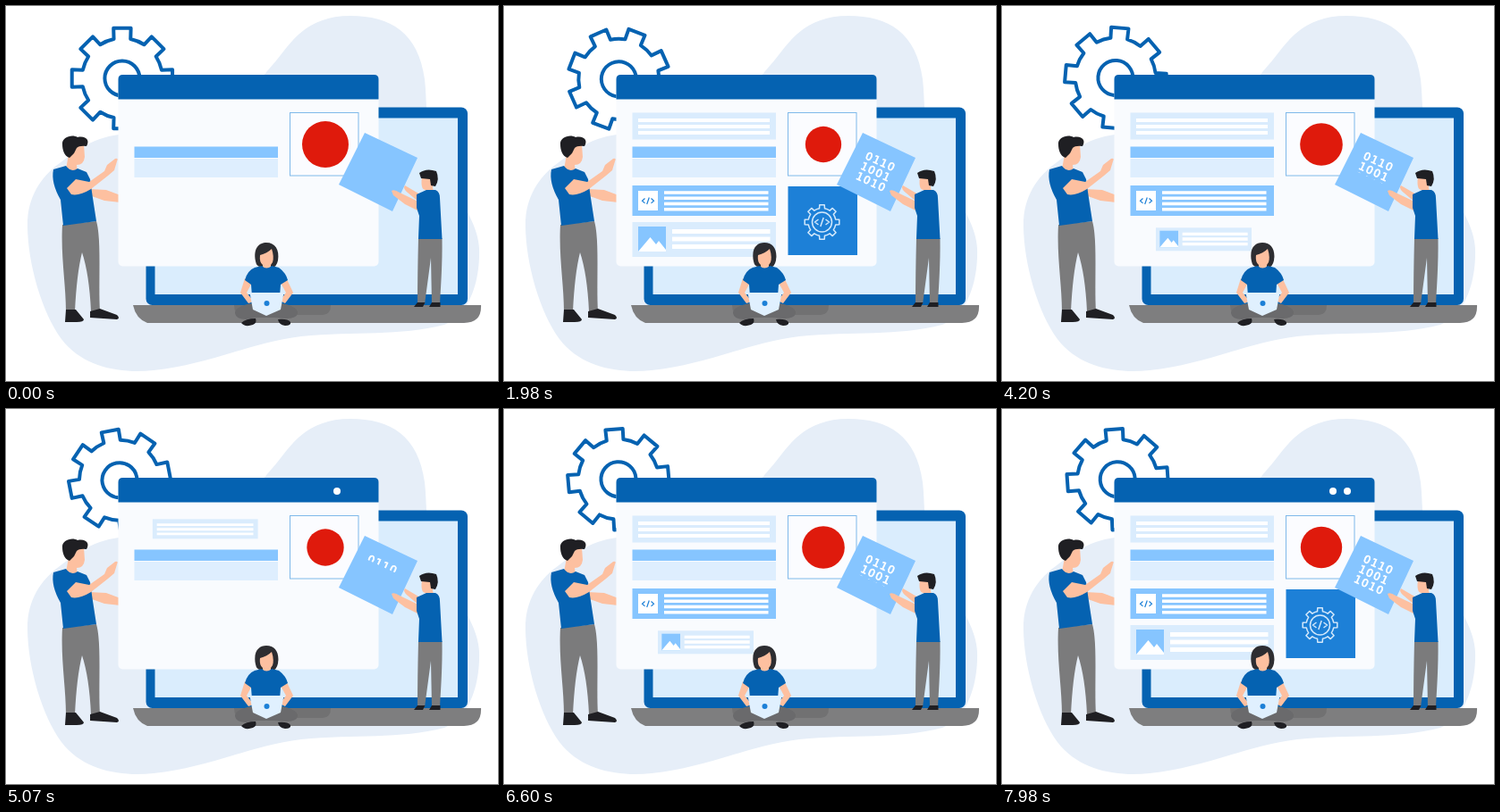
Recreate the animation shown at these times as an HTML page. Size 550 by 420 pixels, loop 8 s.

```html
<!DOCTYPE html>
<html lang="en">
<head>
<meta charset="utf-8">
<title>Building a page</title>
<style>
  html, body { margin: 0; width: 100%; height: 100%; overflow: hidden; background: #fff; }
  svg { display: block; width: 550px; height: 420px; }
  .blue { fill: #0562b1; }
  .sky { fill: #86c5ff; }
  .pale { fill: #daecfd; }
  .white { fill: #fff; }
  .skin { fill: #fdc0a0; }
  .grey { fill: #7b7b7c; }
  .dark { fill: #1f1f23; }
  text { font-family: "DejaVu Sans", sans-serif; }
</style>
</head>
<body>
<svg viewBox="0 0 550 420">
  <defs>
    <clipPath id="digitClip"><rect id="digitWipe" x="-4" y="-1" width="50" height="0"/></clipPath>
    <clipPath id="dotClip"><rect id="dotWipe" x="350" y="80" width="0" height="24"/></clipPath>
  </defs>

  <!-- backdrop -->
  <path fill="#e6eef8" d="M126 144C95 148 76 164 60 176C38 192 24 215 24 245C24 290 42 350 66 378C90 405 130 412 165 408C225 402 270 378 330 370C390 364 440 370 490 357C520 345 530 305 529 272C527 236 497 205 482 172C468 140 471 108 468 82C461 30 430 11 385 11C335 11 318 42 303 60C292 73 284 82 268 104Z"/>
  <g id="bigGear" fill="none" stroke="#0562b1" stroke-width="4" stroke-linejoin="round">
    <path id="bigGearRim"/><circle r="19.500"/>
  </g>

  <!-- laptop -->
  <rect class="blue" x="156.500" y="113.500" width="359.500" height="221.500" rx="7"/>
  <rect x="166.500" y="125.500" width="338.500" height="197.500" fill="#daedfd"/>
  <path fill="#7e7e7f" d="M142 335H531Q532 355 512 355H158Q145 350 142 335Z"/>
  <path fill="#717172" d="M255 335H363Q363 346 354 346H264Q255 346 255 335Z"/>

  <!-- standing man -->
  <g>
    <path class="skin" d="M93 205L112 206L128 212V220L110 218L96 213Z"/>
    <path class="grey" d="M63 245L101 241C107 262 103 310 105 342H95Q93 300 85 276Q79 300 77 342H67C67 312 61 280 63 245Z"/>
    <path class="dark" d="M67 340H78L87 351Q87 354 79 354L66 354ZM94 342L105 339L124 346Q128 350 124 351L94 349Z"/>
    <path class="skin" d="M74 155H87L88 169Q87 178 79 178L80 186L67 183L70 166Z"/>
    <path class="dark" d="M63 155C62 147 74 143 80 147C90 145 94 151 90 157Q82 156 79 159L76 165L71 170C65 168 63 161 63 155Z"/>
    <path class="blue" d="M53 183L67 179Q73 187 80 182L90 186L94 194L97 215L101 241L64 246L61 217Q50 198 53 183Z"/>
    <path class="skin" d="M68 204L78 194L93 197L110 185L113 178L122 171Q126 170 124 174L121 184L114 190L95 205Q82 213 73 211Z"/>
  </g>

  <!-- browser window -->
  <rect x="125.500" y="77" width="291" height="214.500" rx="5" fill="#f9fbfe"/>
  <path class="blue" d="M125.500 104.500V82Q125.500 77 130.500 77H411.500Q416.500 77 416.500 82V104.500Z"/>
  <g class="white" clip-path="url(#dotClip)"><circle cx="370" cy="92" r="4"/><circle cx="386" cy="92" r="4"/></g>

  <rect class="sky" x="143.500" y="157.500" width="160.500" height="12.500"/>
  <rect x="143.500" y="171" width="160.500" height="21" fill="#deeefe"/>

  <g id="textRow">
    <rect class="pale" x="143.500" y="119.500" width="160.500" height="30"/>
    <path class="white" d="M150 126h147v4h-147zM150 133h147v4h-147zM150 140h147v4h-147z"/>
  </g>
  <g id="codeRow">
    <rect class="sky" x="143.500" y="201" width="160.500" height="34"/>
    <rect class="white" x="150" y="207" width="22" height="22"/>
    <path class="white" d="M179 207.300h116.500v3.400h-116.500zM179 213.500h116.500v3.400h-116.500zM179 219.800h116.500v3.400h-116.500zM179 226h116.500v3.400h-116.500z"/>
    <path d="M157.500 215.500l-3 2.700l3 2.700M164.500 215.500l3 2.700l-3 2.700M162.300 214.500l-2.600 7.500" fill="none" stroke="#1d80d7" stroke-width="1.200"/>
  </g>
  <g id="imageRow">
    <rect class="pale" x="143.500" y="242" width="160.500" height="39"/>
    <rect class="sky" x="150" y="247" width="31" height="28"/>
    <path class="white" d="M150 275L163.500 259L170 267L173 263L181 273V275Z"/>
    <path class="white" d="M188 250h109.500v5h-109.500zM188 258.500h109.500v5h-109.500zM188 267h109.500v5h-109.500z"/>
  </g>
  <g id="settingsTile">
    <rect x="317.500" y="202" width="77.500" height="77" fill="#1d80d7"/>
    <g transform="translate(355.500 242)" fill="none" stroke="#d3e8fb" stroke-width="1.500" stroke-linejoin="round">
      <path id="smallGearRim"/><circle r="11"/>
      <path d="M-4 -3l-4 3l4 3M4 -3l4 3l-4 3M1.700 -5l-3.400 10"/>
    </g>
  </g>

  <rect x="317.500" y="119.500" width="76.500" height="70.500" fill="#fbfcff" stroke="#7fb9ea"/>
  <circle id="badge" cx="357" cy="155" fill="#df1a0c"/>

  <!-- digit card -->
  <path class="sky" d="M401 142L460 170L432 230L372 200Z"/>
  <g transform="translate(406.800 162.500) rotate(25)">
    <g clip-path="url(#digitClip)" font-size="12" letter-spacing="1.370" fill="#fff" stroke="#fff" stroke-width=".7">
      <text y="9">0110</text><text y="21.500">1001</text><text y="34">1010</text>
    </g>
  </g>

  <!-- man with the card -->
  <g>
    <path class="skin" d="M446 201L463 211L462 220L449 209Q443 204 446 201ZM431 207Q434 205 440 209L463 220L462 230L446 222L433 212Z"/>
    <path class="grey" d="M461 260H487.500C488 290 486 315 485 334H476L475 282L468 334H460Q460 300 461 260Z"/>
    <path class="dark" d="M460 332H468.500L466 337H456ZM476 332H485.500V337H473Z"/>
    <path class="skin" d="M465 191H477V204L479 209H469V206Q463 206 465 191Z"/>
    <path class="dark" d="M462 187Q470 181 481 185Q485 194 480 202L475 201L474 194L464 193Z"/>
    <path class="blue" d="M459 211L470 206L480 206Q485 208 485 215L487.500 261H461L462 235L459 226Z"/>
  </g>

  <!-- seated woman -->
  <g>
    <path d="M279 286C276 271 283 265 291 265C301 265 306 273 304 285Q302 294 296 292H285Q280 292 279 286Z" fill="#2d2d31"/>
    <path class="skin" d="M284 279Q292 277 297 272Q300 281 298 287L296 290V296H287V290Q283 287 284 279Z"/>
    <path class="skin" d="M267 305L275 310L269 321L277 331L271 333L262 321ZM307 310L314 306L321 321L312 333L306 330L313 321Z"/>
    <path class="blue" d="M278 293L286 291Q291 296 297 291L305 293Q313 299 315 307L307 312L306 325H275L274 312L267 307Q270 296 278 293Z"/>
    <path fill="#6a6a6c" d="M256 344Q256 336 276 333H307Q326 336 326 344Q325 350 313 350L300 349H281L268 351Q257 351 256 344Z"/>
    <path class="dark" d="M263 355Q268 350 279 350Q281 355 276 357Q267 360 263 355ZM304 351Q315 350 318 354Q319 358 312 358Q305 357 304 351Z"/>
    <path d="M275 321H308Q311 321 310 324L307 340L291 347L276 340L273 324Q272 321 275 321Z" fill="#e0f0fe"/>
    <circle cx="291.500" cy="333" r="3" fill="#1d80d7"/>
  </g>
</svg>

<script>
  const LOOP = 8000, STEP = 30, GROW = 450;
  const el = id => document.getElementById(id);
  const clamp = v => Math.min(1, Math.max(0, v));
  // Runs 0 → half → 0 at constant speed.
  const pingPong = (t, half) => half - Math.abs(half - t % (2 * half));

  function gearPath(root, tip, rootHalf, tipHalf) {
    const corners = [];
    for (let a = 0; a < 360; a += 45) {
      for (const [r, d] of [[root, -rootHalf], [tip, -tipHalf], [tip, tipHalf], [root, rootHalf]]) {
        const rad = (a + d) * Math.PI / 180;
        corners.push(`${(r * Math.cos(rad)).toFixed(2)} ${(r * Math.sin(rad)).toFixed(2)}`);
      }
    }
    return corners.reduce((path, point, i) =>
      path + (i % 4 ? 'L' + point : `A${root} ${root} 0 0 1 ${point}`), 'M' + corners.at(-1)) + 'Z';
  }

  el('bigGearRim').setAttribute('d', gearPath(45, 57, 12, 9.800));
  el('smallGearRim').setAttribute('d', gearPath(15.500, 19.500, 11, 8));

  // Parts that grow one after another, with their centres.
  const growing = [['textRow', 220, 134], ['codeRow', 224, 218], ['imageRow', 229, 261], ['settingsTile', 356.5, 240.5]];

  function draw(t) {
    el('bigGear').setAttribute('transform',
      `translate(128.5 80.2) rotate(${t / 30}) translate(1.4 .8)`);

    const build = pingPong(t, 2700);
    growing.forEach(([id, x, y], i) => {
      const s = clamp((build - i * GROW) / GROW);
      el(id).setAttribute('visibility', s ? 'visible' : 'hidden');
      el(id).setAttribute('transform', `translate(${x} ${y}) scale(${s || 1}) translate(${-x} ${-y})`);
    });
    el('digitWipe').setAttribute('height', build ? 1 + build * 0.0208 : 0);
    el('dotWipe').setAttribute('width', 50 * pingPong(t, 1125) / 1125);
    el('badge').setAttribute('r', 26 * (1 - 0.25 * pingPong(t, 1800) / 1800));
  }

  const start = performance.now();
  function tick() {
    const t = (performance.now() - start) % LOOP;
    draw(Math.floor(t / STEP) * STEP);
    requestAnimationFrame(tick);
  }
  tick();
</script>
</body>
</html>
```
